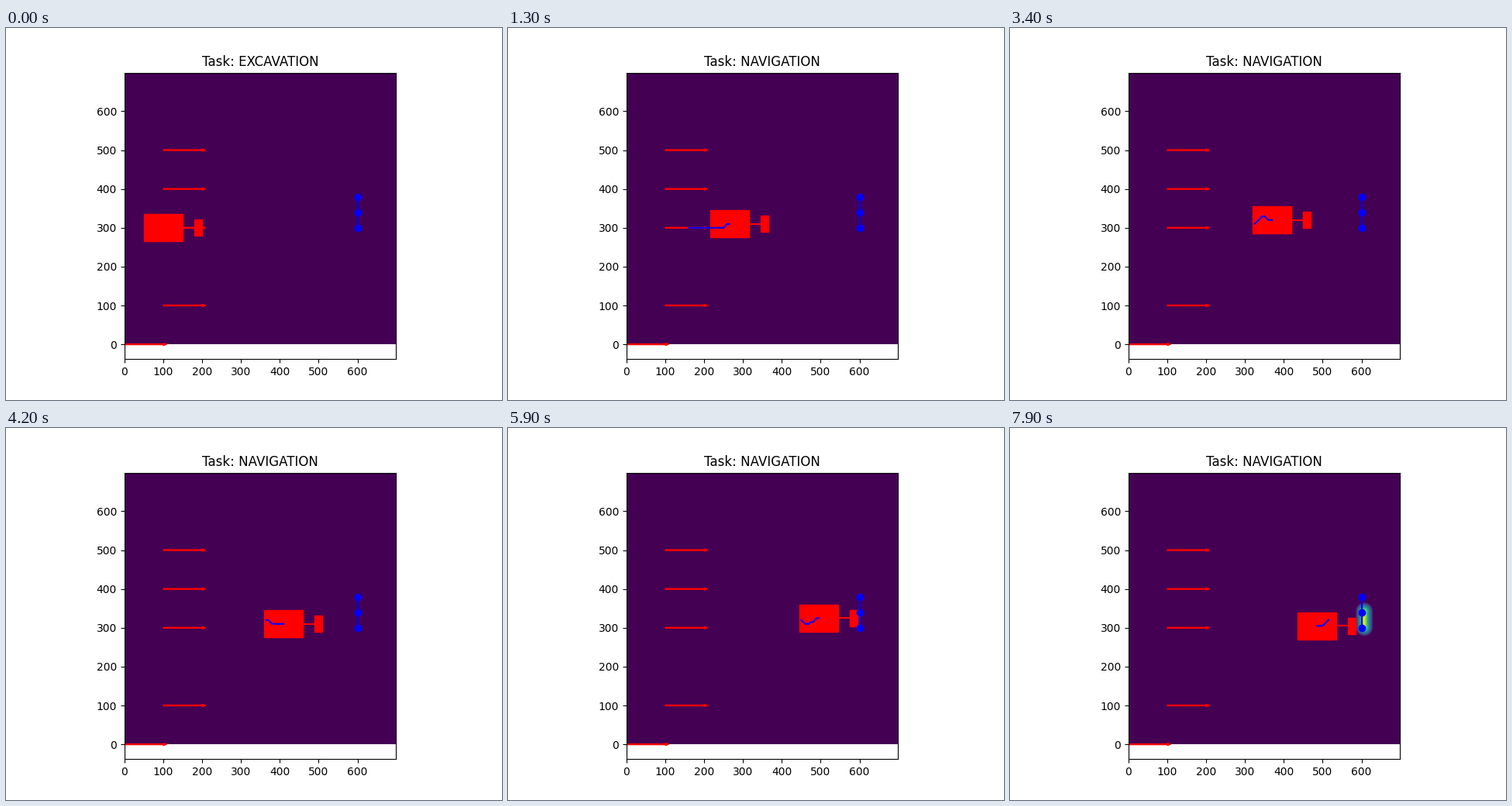
Recreate the animation shown at these times as a matplotlib script. Size 640 by 480 pixels, loop 8000 ms.

```python
import numpy as np
import matplotlib.pyplot as plt
from matplotlib.animation import FuncAnimation
from matplotlib.patches import Rectangle

FRAMES, INTERVAL = 80, 100
SIZE = 700
BODY = np.array([100, 70])
SHOVEL = BODY * [0.2, 0.6]
REACH = 90
TRAIL = 10
STEP = 5
DIG_END, DUMP, LEAVE = 10, 63, 73

# Turning points of the drift in y as (step, y)
TURNS = [(10, 300), (12, 310), (17, 310), (20, 325), (25, 310), (29, 330),
         (37, 310), (46, 310), (50, 320), (52, 310), (54, 310), (60, 330),
         (63, 320), (73, 320), (76, 305)]

# Fast while digging, then steady to the dump site, a stop, and back
t = np.arange(FRAMES)
px = 100 + STEP * (3 * np.clip(t, 0, DIG_END)
                   + np.clip(t - DIG_END, 0, DUMP - DIG_END)
                   - np.clip(t - LEAVE, 0, None))
py = STEP * np.round(np.interp(t, *zip(*TURNS)) / STEP)


def task(i):
    if i < DIG_END:
        return "EXCAVATION"
    return "DUMPING" if DUMP <= i < LEAVE else "NAVIGATION"


def soil_pile(cx, cy, half=SHOVEL[1] / 2, radius=23):
    """Ridge of soil that slopes off evenly on all sides."""
    yy, xx = np.mgrid[:SIZE, :SIZE]
    along = np.maximum(np.abs(yy - cy) - half, 0)
    return np.clip(1 - np.hypot(xx - cx, along) / radius, 0, 1)


flat = np.zeros((SIZE, SIZE))
pile = soil_pile(px[DUMP] + REACH + 1, py[DUMP] + 1)

fig, ax = plt.subplots(figsize=(6.4, 4.8), dpi=100)
ground = ax.imshow(flat, cmap="viridis", origin="lower", vmin=0, vmax=1)

for x, y in [(0, 0), (100, 100), (100, 300), (100, 400), (100, 500)]:
    ax.arrow(x, y, 100, 0, width=2, color="red")

body = ax.add_patch(Rectangle((0, 0), *BODY, color="red"))
shovel = ax.add_patch(Rectangle((0, 0), *SHOVEL, color="red"))
arm, = ax.plot([], [], color="red")
trail, = ax.plot([], [], color="blue")
ax.plot([600] * 3, [300, 340, 380], "o-", color="blue")

ax.set_xlim(-0.5, SIZE - 0.5)
ax.set_ylim(-38.1, SIZE - 0.5)
ax.set_xticks(range(0, SIZE, 100))
ax.set_yticks(range(0, SIZE, 100))
title = ax.set_title("Task: EXCAVATION")


def center(rect, x, y):
    rect.set_xy((x - rect.get_width() / 2, y - rect.get_height() / 2))


def update(i):
    x, y = px[i], py[i]
    center(body, x, y)
    center(shovel, x + REACH, y)
    arm.set_data([x, x + REACH], [y, y])
    recent = slice(max(0, i - TRAIL + 1), i + 1)
    trail.set_data(px[recent], py[recent])
    ground.set_data(pile if i >= DUMP else flat)
    title.set_text(f"Task: {task(i)}")
    return ground, body, shovel, arm, trail, title


anim = FuncAnimation(fig, update, frames=FRAMES, interval=INTERVAL,
                     repeat=True, repeat_delay=0, blit=False)
plt.show()
```
